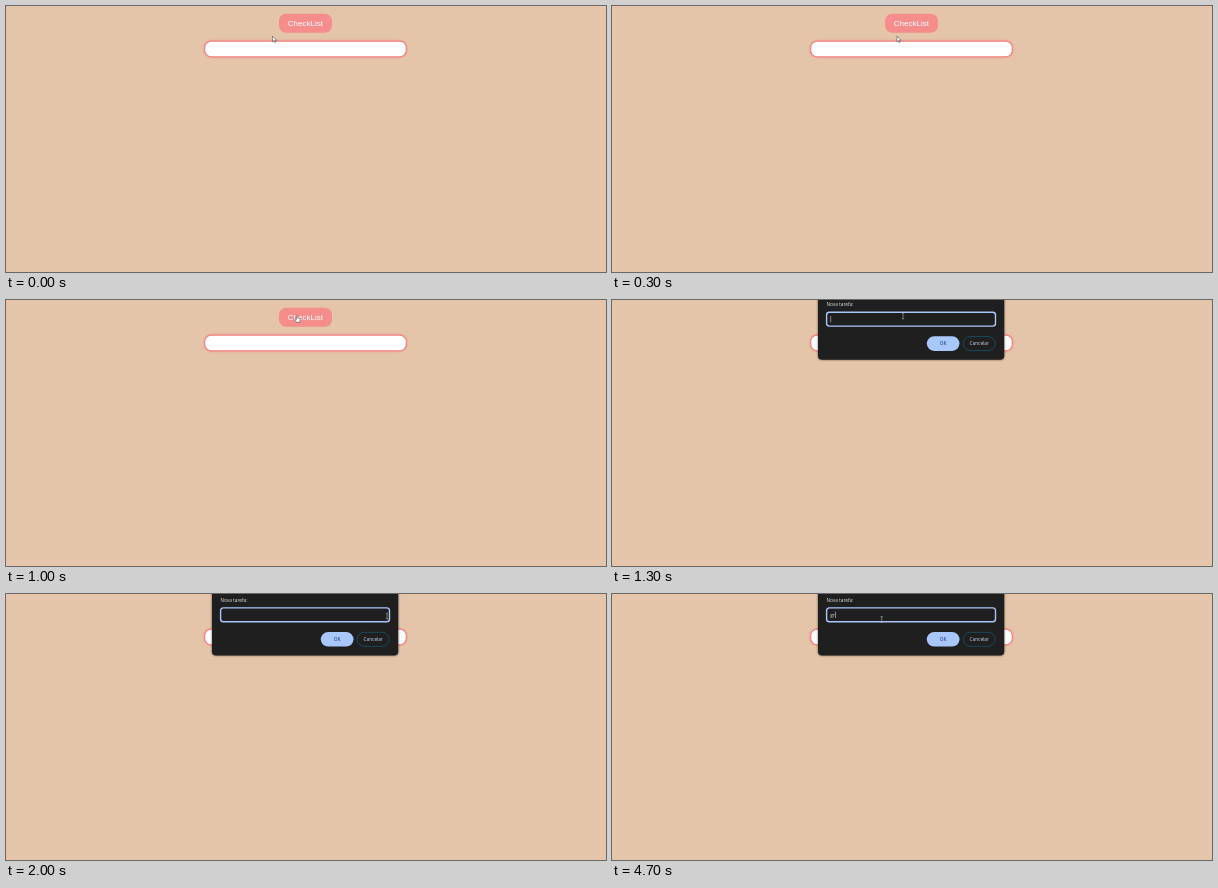
These frames come from a looping animation (600x266 px, 5 s). An HTML page:

```html
<!DOCTYPE html>
<html lang="pt">
<head>
<meta charset="utf-8">
<title>CheckList</title>
<style>
  html, body { margin: 0; width: 100%; height: 100%; overflow: hidden; background: #e5c5aa; }
  svg { display: block; width: 100%; height: 100%; }
  .title { font: 8px "Liberation Sans", Arial, sans-serif; fill: #fff; }
  #dialog { font: 4.75px "Open Sans", "Noto Sans", sans-serif; fill: #e3e3e3; }
  .glow { filter: drop-shadow(0 0 1px #f08080b0); }
  .shade { filter: drop-shadow(0 .6px 1.2px #0009); }
</style>
</head>
<body>
<svg viewBox="0 0 600 266">
  <rect x="273" y="7.8" width="53" height="18.9" rx="7" fill="#f58d8d"/>
  <text class="title" x="281.8" y="19.8">CheckList</text>
  <rect class="glow" x="198.6" y="35.2" width="201.8" height="15.6" rx="6.5" fill="#fff" stroke="#f08585" stroke-width="1.3"/>

  <g id="dialog">
    <rect class="shade" x="206" y="-12" width="186.2" height="73.4" rx="4" fill="#1f1f1f"/>
    <text x="214.5" y="8.2">Nova tarefa:</text>
    <rect x="214.6" y="13.9" width="168.9" height="13.9" rx="2.8" fill="#1f1f1f" stroke="#a8c7fa" stroke-width="1.4"/>
    <text id="entry" x="218.2" y="22.5"></text>
    <path id="caret" d="M0 17.6v6.4" stroke="#d0d0d0" stroke-width=".6"/>
    <rect x="314.8" y="38" width="32.7" height="14.6" rx="7.3" fill="#a8c7fa"/>
    <text x="331.1" y="47" text-anchor="middle" fill="#062e6f">OK</text>
    <rect x="351.2" y="38.3" width="32" height="14" rx="7" fill="none" stroke="#14566c" stroke-width=".8"/>
    <text x="367.2" y="47" text-anchor="middle" fill="#c4d8fa">Cancelar</text>
  </g>

  <g id="pointer">
    <path id="arrow" d="M0 0V5.6L1.3 4.4L2.2 6.4L3.1 6L2.2 4.1H4Z" fill="#fff" stroke="#333" stroke-width=".5"/>
    <path id="hand" d="M-.9 .8V-3Q-.2 -3.9 .4 -3V-.8L2.6 -.2Q3.1 0 3 .8L2.4 3.5H-.9L-2.6 .9Q-2.2 0 -.9 .8Z" fill="#fff" stroke="#444" stroke-width=".55"/>
    <path id="beam" d="M-1.2 -2.8H1.2M0 -2.8V2.8M-1.2 2.8H1.2" fill="none" stroke="#aaa" stroke-width=".65"/>
  </g>
</svg>
<script>
const LOOP = 5000;
const el = id => document.getElementById(id);
const show = (id, on) => el(id).style.display = on ? '' : 'none';

// start time, pointer kind, x, y
const moves = [
  [0, 'arrow', 266.5, 30.2],
  [100, 'hand', 300, 12],
  [200, 'arrow', 311, 35],
  [300, 'arrow', 285, 30.2],
  [600, 'hand', 290, 22],
  [700, 'hand', 307, 18],
  [800, 'hand', 301, 12],
  [900, 'hand', 277, 15],
  [1000, 'hand', 291.3, 18.8],
  [1300, 'beam', 291, 16],
  [1900, 'arrow', 397, 46],
  [2000, 'beam', 381, 22],
  [2600, 'beam', 269.7, 25.5]
];

function draw(t) {
  const [, kind, x, y] = moves.findLast(m => m[0] <= t);
  for (const k of ['arrow', 'hand', 'beam']) show(k, k === kind);
  el('pointer').setAttribute('transform', `translate(${x} ${y})`);

  const typed = t >= 4700;
  show('dialog', t >= 1300);
  el('dialog').setAttribute('transform', `translate(0 ${t < 1400 ? -1.7 : 0})`);
  el('entry').textContent = typed ? 'gr' : '';
  show('caret', t < 1900 || typed);
  el('caret').setAttribute('transform', `translate(${typed ? 223.5 : 218.7} 0)`);
}

const start = performance.now();
function frame() {
  draw((performance.now() - start) % LOOP);
  requestAnimationFrame(frame);
}
frame();
</script>
</body>
</html>
```
